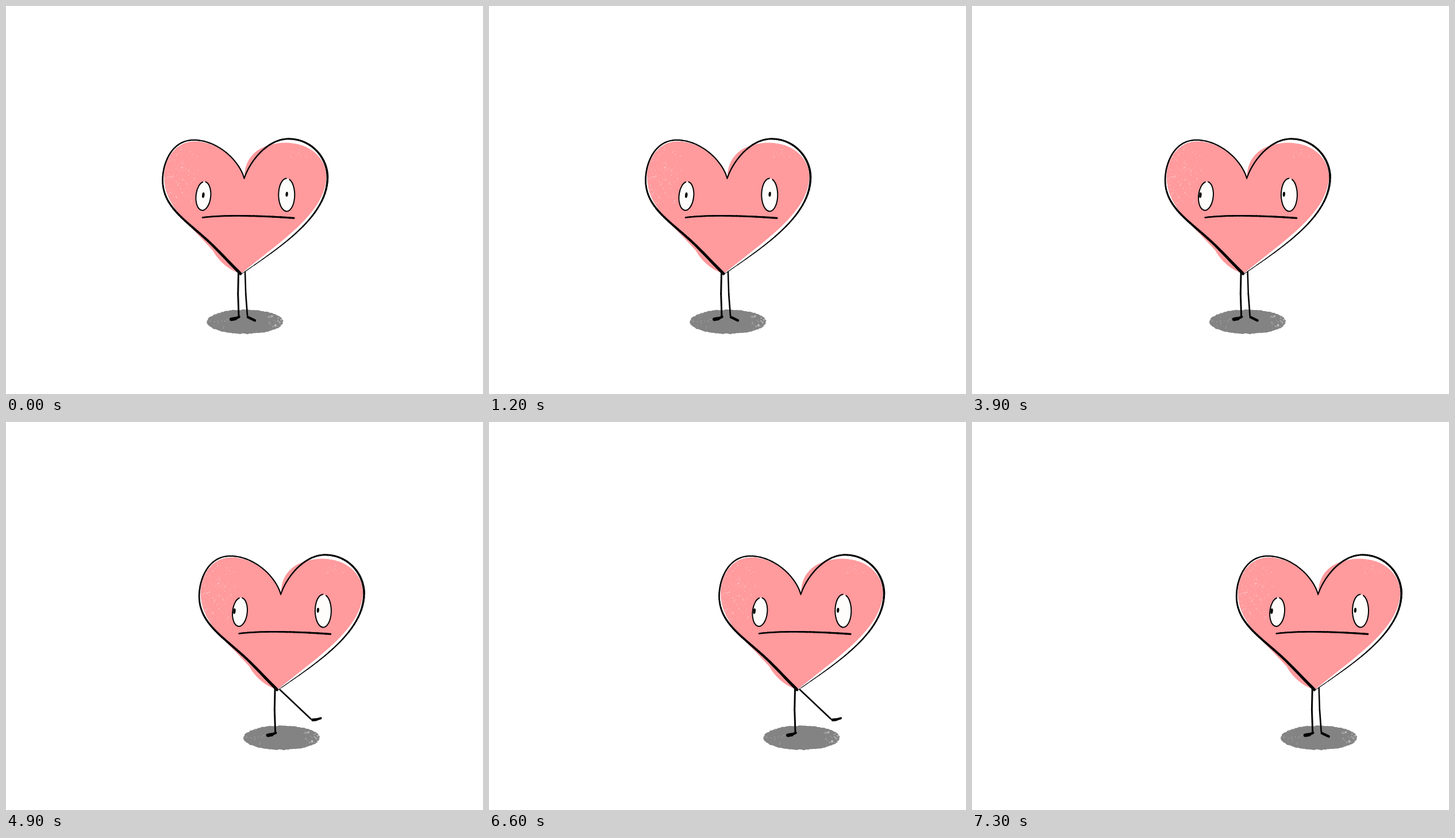
Animation of 830x674 px, one loop 8000 ms. Source, as an HTML page with a canvas:

```html
<!DOCTYPE html>
<html lang="en">
<head>
<meta charset="utf-8">
<title>Heart taking small steps</title>
<style>
html, body { margin: 0; width: 100%; height: 100%; overflow: hidden; background: #fff; }
canvas { display: block; }
</style>
</head>
<body>
<canvas id="stage" width="830" height="674"></canvas>
<script>
const ctx = document.getElementById('stage').getContext('2d');
const LOOP = 8000;
const INK = '#050505', PINK = '#ff9a9d', GREY = '#838383';

// Walking: stand for a second, lift the leg, then land one stride further
const WALK_START = 2200, STAND = 1000, STEP = 1700;
const STRIDES = [0, 63.6, 128, 187.7];

function poseAt(t) {
  const walk = t - WALK_START;
  return {
    x: STRIDES[Math.max(0, Math.floor(walk / STEP))],
    kick: walk >= 0 && walk % STEP >= STAND,
    left: walk >= 0 || (t >= 500 && t < 1200)
  };
}

function random(seed) {
  return () => (seed = (seed * 16807) % 2147483647) / 2147483647;
}

function bezier(a, b, c, d, t) {
  const s = 1 - t;
  return s * s * s * a + 3 * s * s * t * b + 3 * s * t * t * c + t * t * t * d;
}

// Cubic strokes with changing width: [x, y, width], then [c1x, c1y, c2x, c2y, x, y, width]
function brush(start, ...curves) {
  ctx.strokeStyle = INK;
  ctx.lineCap = 'round';
  let [x, y, w] = start;
  for (const [ax, ay, bx, by, ex, ey, ew] of curves) {
    let px = x, py = y;
    for (let i = 1; i <= 28; i++) {
      const t = i / 28;
      const nx = bezier(x, ax, bx, ex, t), ny = bezier(y, ay, by, ey, t);
      ctx.lineWidth = w + (ew - w) * t;
      ctx.beginPath();
      ctx.moveTo(px, py);
      ctx.lineTo(nx, ny);
      ctx.stroke();
      px = nx;
      py = ny;
    }
    [x, y, w] = [ex, ey, ew];
  }
}

function line(width, x1, y1, x2, y2) {
  ctx.strokeStyle = INK;
  ctx.lineCap = 'round';
  ctx.lineWidth = width;
  ctx.beginPath();
  ctx.moveTo(x1, y1);
  ctx.lineTo(x2, y2);
  ctx.stroke();
}

function oval(x, y, rx, ry, tilt, color) {
  ctx.fillStyle = color;
  ctx.beginPath();
  ctx.ellipse(x, y, rx, ry, tilt, 0, Math.PI * 2);
  ctx.fill();
}

// Pale specks inside a box, denser towards its (x, y) side
function specks(count, seed, x, y, w, h, size) {
  const rnd = random(seed);
  for (let i = 0; i < count; i++) {
    const r = 0.4 + rnd() * size;
    oval(x + rnd() ** 2 * w, y + rnd() * h, r, r, 0, `rgba(255,255,255,${0.12 + rnd() * 0.25})`);
  }
}

function shadow() {
  const rnd = random(23);
  ctx.save();
  ctx.beginPath();
  for (let a = 0; a < Math.PI * 2; a += 0.05) {
    const rough = (rnd() - 0.5) * 1.6;
    ctx.lineTo(416 + (66.5 + rough) * Math.cos(a), 548.5 + (21 + rough) * Math.sin(a));
  }
  ctx.closePath();
  ctx.fillStyle = GREY;
  ctx.fill();
  ctx.clip();
  specks(50, 91, 483, 533, -28, 28, 1.6);
  specks(40, 17, 349, 533, 40, 28, 0.9);
  ctx.restore();
}

function legs(kick) {
  line(3, 404.5, 463, 403.7, 500);
  line(3, 403.7, 500, 405, 539);
  line(4.5, 405.5, 540, 399, 543);
  line(6, 399, 543, 392, 544.3);
  if (kick) {
    line(2.6, 413, 465, 467, 516);
    line(4.8, 470, 517.5, 476, 517);
    line(4, 476, 517, 484, 514.6);
  } else {
    line(2.5, 416, 462, 417.2, 500);
    line(2.7, 417.2, 500, 420, 538);
    line(4.4, 421, 540.5, 433, 546.3);
  }
}

const BODY = new Path2D(`M415 297 C415 262 440 238 488 237.5 C530 238 557 265 557.5 296
  C556 360 478 408 409 465 C385 458 368 440 360 425 C312 372 275 345 275 297
  C275 265 295 236 328 235 C368 235 405 267 415 297 Z`);

function body() {
  ctx.save();
  ctx.fillStyle = PINK;
  ctx.fill(BODY);
  ctx.clip(BODY);
  specks(260, 71, 274, 245, 62, 100, 0.8);
  specks(90, 37, 555, 238, -60, 26, 0.8);
  ctx.restore();

  brush([414.5, 299.5, 2],
    [406, 268, 368, 233, 327, 232.8, 2.2],
    [289, 232.5, 272.5, 272, 272.5, 303, 2.6],
    [273, 352, 318, 375, 360, 416, 4.2],
    [376, 432, 392, 449, 408, 465, 5]);
  brush([414.5, 299.5, 2],
    [424, 270, 455, 230.5, 492, 230.8, 2.9],
    [532, 231, 559.5, 264, 559.5, 298, 3.6],
    [559, 365, 480, 417, 409, 466, 1]);
}

function eye(x, y, rx, ry, tilt, gap) {
  oval(x, y, rx, ry, tilt, '#fefdfc');
  ctx.strokeStyle = INK;
  ctx.lineWidth = 2;
  ctx.beginPath();
  ctx.ellipse(x, y, rx, ry, tilt, gap + 0.2, gap - 0.2 + Math.PI * 2);
  ctx.stroke();
}

function face(left) {
  eye(343.4, 330, 12.8, 25, 0.1, -1.65);
  eye(488.3, 328, 14, 28.6, 0, -1.4);
  oval(left ? 333.8 : 343.3, 328.6, 2.2, 4.8, 0.1, INK);
  oval(left ? 479.2 : 488.6, 327, 2.1, 4.2, 0.1, INK);
  brush([342, 367.5, 2.6], [375, 363, 430, 363.5, 501, 368.3, 3.2]);
}

function frame() {
  const pose = poseAt(performance.now() % LOOP);
  ctx.fillStyle = '#fff';
  ctx.fillRect(0, 0, 830, 674);
  ctx.save();
  ctx.translate(pose.x, 0);
  shadow();
  legs(pose.kick);
  body();
  face(pose.left);
  ctx.restore();
  requestAnimationFrame(frame);
}
frame();
</script>
</body>
</html>
```
